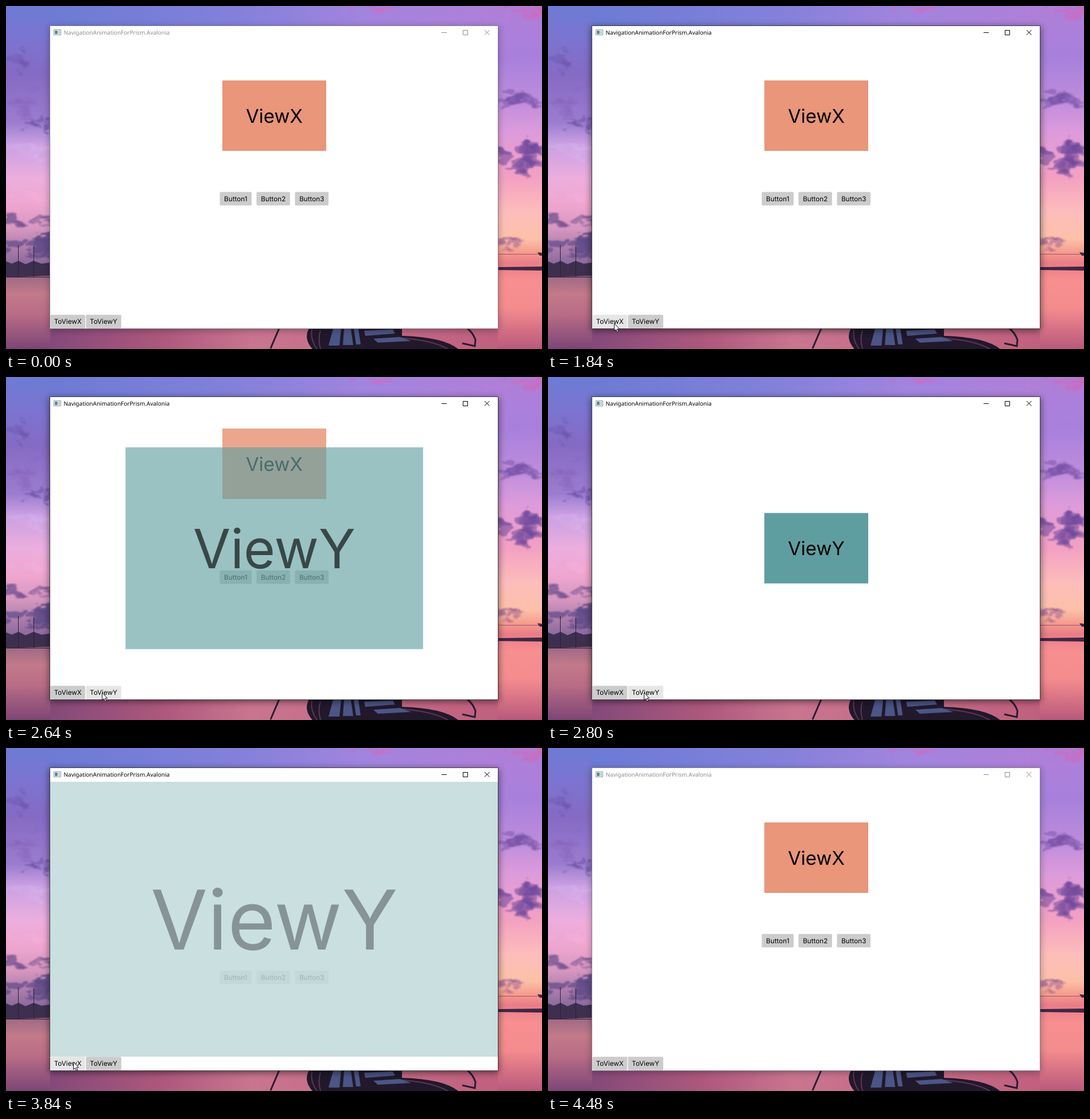
An HTML page that plays this animation: 934x599 px, repeating every 4.52 s.

```html
<!DOCTYPE html>
<html lang="en">
<head>
<meta charset="utf-8">
<title>View navigation</title>
<style>
  html, body { margin: 0; width: 100%; height: 100%; overflow: hidden; }
  svg { position: absolute; left: 0; top: 0; will-change: transform; }
  text { font: 11.7px Inter, sans-serif; text-anchor: middle; text-rendering: geometricPrecision; }
  .big { font-size: 33px; }
  #title { font: 10px "Noto Sans", sans-serif; text-anchor: start; }
</style>
</head>
<body>
<!-- desktop -->
<svg width="934" height="599" viewBox="0 0 934 599">
  <defs>
    <linearGradient id="left" x2="0" y2="1">
      <stop offset="0" stop-color="#6c7bd4"/>
      <stop offset=".1" stop-color="#7c74d0"/>
      <stop offset=".2" stop-color="#856ac4"/>
      <stop offset=".34" stop-color="#9c7ccf"/>
      <stop offset=".4" stop-color="#c89fe2"/>
      <stop offset=".5" stop-color="#ebaedf"/>
      <stop offset=".58" stop-color="#eea6cf"/>
      <stop offset=".65" stop-color="#d596bf"/>
      <stop offset=".75" stop-color="#8d6a9c"/>
      <stop offset=".79" stop-color="#a06a84"/>
      <stop offset=".84" stop-color="#c37a8a"/>
      <stop offset=".9" stop-color="#b86c86"/>
      <stop offset="1" stop-color="#7d4576"/>
    </linearGradient>
    <linearGradient id="right" x2="0" y2="1">
      <stop offset="0" stop-color="#b07fd8"/>
      <stop offset=".15" stop-color="#a780dc"/>
      <stop offset=".27" stop-color="#bd8cdc"/>
      <stop offset=".37" stop-color="#dd9bdb"/>
      <stop offset=".5" stop-color="#f3a0c2"/>
      <stop offset=".6" stop-color="#fdbdbb"/>
      <stop offset=".68" stop-color="#fcc0a8"/>
      <stop offset=".72" stop-color="#f49a8c"/>
      <stop offset=".75" stop-color="#ea7c88"/>
      <stop offset=".8" stop-color="#f78f90"/>
      <stop offset=".88" stop-color="#f48c8e"/>
      <stop offset="1" stop-color="#b9587c"/>
    </linearGradient>
    <linearGradient id="sky">
      <stop offset="0" stop-color="#6c7bd4"/>
      <stop offset=".4" stop-color="#8280da"/>
      <stop offset=".7" stop-color="#a184de"/>
      <stop offset="1" stop-color="#b07fd8"/>
    </linearGradient>
    <linearGradient id="water">
      <stop offset="0" stop-color="#84497a"/>
      <stop offset=".25" stop-color="#ad587c"/>
      <stop offset=".45" stop-color="#c97590"/>
      <stop offset="1" stop-color="#c0607e"/>
    </linearGradient>
    <filter id="ragged">
      <feTurbulence type="fractalNoise" baseFrequency=".03 .06" numOctaves="3" seed="4"/>
      <feDisplacementMap in="SourceGraphic" scale="34" xChannelSelector="R" yChannelSelector="G"/>
      <feGaussianBlur stdDeviation="1.300"/>
    </filter>
  </defs>
  <path fill="url(#left)" d="M0 0h467v599h-467z"/>
  <path fill="url(#right)" d="M467 0h467v599h-467z"/>
  <path fill="url(#sky)" d="M77 0h780v60h-780z"/>
  <path fill="url(#water)" d="M77 550h780v49h-780z"/>
  <g id="clouds" filter="url(#ragged)"></g>
  <path fill="#352a49" opacity=".9" d="M0 446l10 4 12-5 12 6 14-6 14 5 15-2v23l-77 3z"/>
  <path stroke="#2a2038" fill="none" d="M21.500 418v56M48.500 420v54M0 473.500h77"/>
  <path stroke="#a14f73" d="M857 433.500h77"/>
  <path fill="#3f2745" d="M857 456l77-1v7l-77-1zM926 430l8 1v5h-4z"/>
  <path stroke="#2a1b31" stroke-width="3" fill="none" d="M476 563L461 598M804 563q10 8 14 20l-1 11-22-5"/>
  <path fill="#21182c" d="M528 563h162v13q72 2 98 23H534q-16-18-6-36z"/>
  <path stroke="#5c3650" stroke-width="2" fill="none" d="M533 565q-3 18 9 34M548 567q-5 14 0 32M690 580q54 4 80 19"/>
  <path fill="#4b5686" d="M570 564h14l-3 29h-19zM589 564h12l4 28h-18zM606 564h8l4 27h-8zM624 567l50-2 4 7-52 4zM640 581l46-3 20 7-58 3z"/>
</svg>

<!-- window -->
<svg width="934" height="599" viewBox="0 0 934 599">
  <defs>
    <filter id="blur"><feGaussianBlur stdDeviation="6"/></filter>
    <clipPath id="area"><path d="M77 59h780v480h-780z"/></clipPath>
  </defs>
  <rect id="shadow" x="75" y="36" width="784" height="531" filter="url(#blur)"/>
  <rect id="frame" x="76.5" y="34.5" width="781" height="529" fill="#fff"/>
  <path fill="#fff" stroke="#8a9499" d="M83.500 41.500h12v9h-12z"/>
  <path fill="#4f8f91" d="M85 43h5v6h-5z"/>
  <path fill="#b9c6ca" d="M91 43h3v6h-3z"/>
  <text id="title" x="100.500" y="50">NavigationAnimationForPrism.Avalonia</text>
  <path id="controls" fill="none" d="M759 46.500h9M796.500 42.500h8v8h-8zM834 42l8.500 8.500M842.500 42l-8.500 8.500"/>

  <g clip-path="url(#area)">
    <g id="cardX">
      <path fill="#e9967a" d="M377 130h181v123h-181z"/>
      <text class="big" x="467.500" y="203.800">ViewX</text>
    </g>
    <g id="buttons"></g>
    <g id="cardY">
      <path fill="#5f9ea0" d="M377 237.500h181v123h-181z"/>
      <text class="big" x="467.500" y="311.100">ViewY</text>
    </g>
  </g>
  <g id="bar"></g>
  <path id="cursor" fill="#fff" stroke="#000" stroke-width=".9" stroke-linejoin="round"
    d="M.5.5v13l3-2.800 2.200 4.800 2.100-1-2.200-4.500h4z"/>
</svg>
<script>
const $ = id => document.getElementById(id);
const LOOP = 4520, STEP = 40;
const FOCUS = [1120, 4440];
const PRESSES = [[1120, 1320], [2280, 2371], [3440, 3551]];
// time, x, y of the pointer
const PATH = [
  [520, 191, 583], [1000, 115, 554], [1840, 115, 554], [2120, 167, 551],
  [3080, 167, 551], [3400, 117, 548], [4360, 117, 548], [4440, 117, 573]
];

function add(parent, tag, attrs, text = '') {
  const node = document.createElementNS('http://www.w3.org/2000/svg', tag);
  for (const key in attrs) node.setAttribute(key, attrs[key]);
  node.textContent = text;
  return parent.appendChild(node);
}

function addButton(parent, x, y, width, label) {
  const group = add(parent, 'g', {});
  const face = add(group, 'rect', { x, y, width, height: 23.5, rx: 2, fill: '#ccc' });
  add(group, 'text', { x: x + width / 2, y: y + 16 }, label);
  return { group, face, x, y, width };
}

let seed = 7;
const random = () => (seed = seed * 16807 % 2147483647) / 2147483647;

function addCloud(x, y, width, height, fill, opacity = .5) {
  for (let i = 0; i < 12; i++) {
    add($('clouds'), 'ellipse', {
      cx: x + (random() - .5) * width, cy: y + (random() - .5) * height,
      rx: width * (.12 + random() * .16), ry: height * (.1 + random() * .14),
      fill, opacity
    });
  }
}

addCloud(14, 98, 50, 26, '#6650a2', .35);
addCloud(20, 170, 60, 30, '#8462b5', .3);
addCloud(62, 205, 50, 20, '#6750a0');
addCloud(30, 250, 90, 24, '#dcb2ee', .25);
addCloud(30, 320, 90, 30, '#f7b0d6', .2);
addCloud(15, 378, 44, 20, '#74518f');
addCloud(60, 377, 36, 16, '#74518f');
addCloud(40, 420, 100, 36, '#604a88', .7);
addCloud(645, 0, 80, 7, '#e064b8');
addCloud(905, 7, 60, 18, '#cf68bd', .4);
addCloud(900, 161, 66, 28, '#7551a5');
addCloud(893, 268, 80, 46, '#70479b', .55);
addCloud(920, 245, 30, 28, '#70479b');
addCloud(874, 414, 36, 10, '#9a5c91');

addButton($('buttons'), 372.5, 324.7, 55.5, 'Button1');
addButton($('buttons'), 436.5, 324.7, 58.5, 'Button2');
addButton($('buttons'), 503.5, 324.7, 58.5, 'Button3');
const bar = [
  addButton($('bar'), 77.5, 539.3, 60.5, 'ToViewX'),
  addButton($('bar'), 139.3, 539.3, 61.5, 'ToViewY')
];

const ramp = (t, from, to) => Math.min(1, Math.max(0, (t - from) / (to - from)));
const within = (t, [from, to]) => t >= from && t < to;

function pointerAt(t) {
  let [, x, y] = PATH[0];
  for (let i = 1; i < PATH.length; i++) {
    const p = ramp(t, PATH[i - 1][0], PATH[i][0]);
    const ease = p * p * (3 - 2 * p);
    x += (PATH[i][1] - PATH[i - 1][1]) * ease;
    y += (PATH[i][2] - PATH[i - 1][2]) * ease;
  }
  return { x, y };
}

function drawWindow(t) {
  const focused = within(t, FOCUS);
  const ink = focused ? '#000' : '#8c8c8c';
  $('shadow').setAttribute('opacity', focused ? .5 : .28);
  $('frame').setAttribute('stroke', focused ? '#444' : '#858090');
  $('title').setAttribute('fill', ink);
  $('controls').setAttribute('stroke', ink);
}

// Faces and labels fade one by one, so a face shows through its label.
function place(id, transform, opacity) {
  $(id).setAttribute('transform', transform);
  for (const part of $(id).querySelectorAll('path, rect, text')) part.setAttribute('opacity', opacity);
}

function drawViews(t) {
  const y = ramp(t, 2371, 2800) - ramp(t, 3551, 3981);
  const x = t < 3000 ? 1 - ramp(t, 2371, 2800) ** 4 : ramp(t, 3551, 4031) ** 3;
  place('cardX', `translate(0 ${Math.round(-260 * (1 - x))})`, x);
  place('buttons', `translate(0 ${Math.round(82 * (1 - x))})`, x);
  place('cardY', `translate(467.5 299) scale(${6 - 5 * y}) translate(-467.5 -299)`, y);
}

function drawPointer(t) {
  const { x, y } = pointerAt(t);
  const shown = within(t, [40, 4480]);
  const pressed = PRESSES.some(span => within(t, span));
  $('cursor').setAttribute('transform', `translate(${Math.round(x)} ${Math.round(y)})`);
  $('cursor').setAttribute('visibility', shown ? 'visible' : 'hidden');
  for (const b of bar) {
    const over = shown && x >= b.x && x < b.x + b.width && y >= b.y && y < b.y + 24;
    const cx = b.x + b.width / 2, cy = b.y + 11.75;
    b.face.setAttribute('fill', !over ? '#ccc' : pressed ? '#999' : '#e6e6e6');
    b.group.setAttribute('transform', over && pressed
      ? `translate(${cx} ${cy}) scale(.98) translate(${-cx} ${-cy})` : '');
  }
}

function draw() {
  const t = Math.floor(performance.now() % LOOP / STEP) * STEP;
  drawWindow(t);
  drawViews(t);
  drawPointer(t);
  requestAnimationFrame(draw);
}
draw();
</script>
</body>
</html>
```
